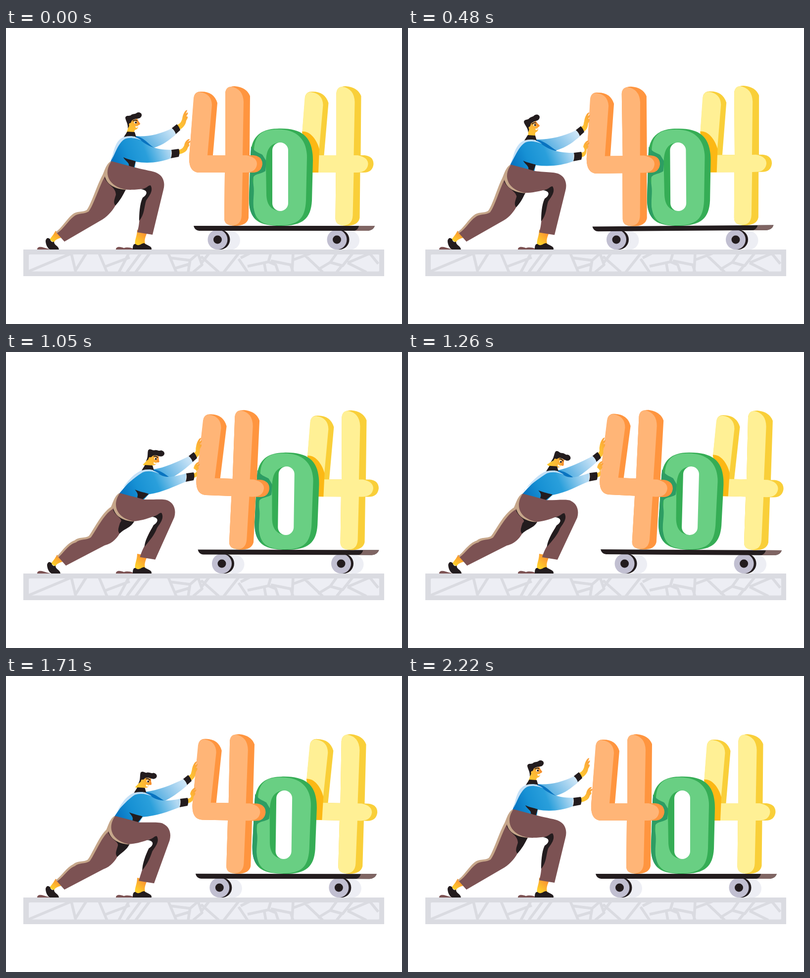
An HTML page for the animation above (2250 ms loop, 800 by 600 pixels).

```html
<!DOCTYPE html>
<html lang="en">
<head>
<meta charset="utf-8">
<title>404</title>
<style>
html, body { margin: 0; width: 100%; height: 100%; overflow: hidden; background: #fff; }
svg { display: block; width: 100%; height: 100%; }
.ink { fill: #231c1e; }
.pants { fill: #7c5253; }
.tan { fill: #c6a68a; }
.skin { fill: url(#skin); }
</style>
</head>
<body>
<svg viewBox="0 0 800 600">
<defs>
  <linearGradient id="skin" x1="0" y1="1" x2="1" y2="0">
    <stop offset="0" stop-color="#ffcb2f"/><stop offset=".45" stop-color="#fdbb35"/><stop offset="1" stop-color="#fb9a3c"/>
  </linearGradient>
  <linearGradient id="ankle" x1="0" y1="1" x2=".7" y2="0">
    <stop offset=".2" stop-color="#ffcf2b"/><stop offset="1" stop-color="#f98b33"/>
  </linearGradient>
  <linearGradient id="shirt" x1="0" y1=".75" x2="1" y2=".55">
    <stop offset="0" stop-color="#0470bf"/><stop offset=".3" stop-color="#1791d4"/>
    <stop offset=".6" stop-color="#2a9fdb"/><stop offset="1" stop-color="#b4daf3"/>
  </linearGradient>
  <linearGradient id="sleeve" x1="0" y1=".6" x2="1" y2=".2">
    <stop offset="0" stop-color="#3fa6de"/><stop offset=".45" stop-color="#86c4ea"/><stop offset="1" stop-color="#d3e8f8"/>
  </linearGradient>
  <g id="four">
    <path style="fill:var(--side)" d="M380 138Q383 128 395 129Q420 129 427 152L418 258H443V132Q444 118 462 118Q486 120 493 138L492 258H500Q518 260 518 276Q516 293 498 293H491L490 385Q487 401 462 401Q441 400 441 386L442 293H390Q369 292 370 262Z"/>
    <path style="fill:var(--face)" d="M379 142Q381 129 392 130Q415 133 416 156L407 258H443V132Q444 119 455 119Q479 123 480 150L478 258H486Q507 262 507 276Q505 293 484 293H478L476 380Q475 401 455 400Q441 399 441 386L442 293H390Q369 292 370 262Z"/>
  </g>
  <g id="wheel">
    <circle cx="454" cy="430.5" r="19" fill="#edeef4"/>
    <circle cx="432.5" cy="429" r="20" class="ink"/>
    <circle cx="427.5" cy="429" r="20" fill="#c1bfd1"/>
    <circle cx="427.5" cy="429" r="8.5" class="ink"/>
  </g>
</defs>

<g id="wheels"><use href="#wheel"/><use href="#wheel" x="241"/></g>
<rect x="35" y="449" width="729" height="54" fill="#dadbe1"/>
<rect x="46" y="459" width="708" height="34.500" rx="2" fill="#edeef4"/>
<path fill="none" stroke="#dadbe1" stroke-width="5.500" stroke-linejoin="round" d="M44 494L132 457 141 495M162 457L140 492M188 457L204 495M202 483L250 465M248 457L235 482 228 495M272 457L244 495M290 457L262 495M328 457L344 495M332 466L372 471 388 457M342 487L372 478M372 470L368 495M388 457L396 480 378 495M394 463L430 495M396 475L410 457M470 457L440 495M470 468L488 495M474 466L492 457M488 483L530 474 535 457M522 478L525 495M530 474L545 480 550 495M535 472L575 480 580 495M580 457L578 495M580 470L615 457M605 462L640 495M630 490L655 475 668 457M655 475L680 482 700 457M680 480L668 495M690 476L735 457M690 476L728 495M735 457L752 478"/>
<circle cx="239" cy="490" r="4.500" fill="#edeef4"/>

<g id="cart">
  <path class="ink" d="M379 401H745Q742 410 731 411H390Q381 410 379 401Z"/>
  <path fill="#7f6563" d="M713 401H745Q742 410 731 411H704Q711 409 713 401Z"/>
  <g id="yellow">
    <use href="#four" x="224.500" style="--face:#fff095;--side:#f9cf39"/>
    <path fill="#fcb814" d="M598 210C616 208 629 230 633 246L631 293H616Z"/>
  </g>
  <g id="zero">
    <path fill="#35ad55" d="M548 204C600 202 620 222 620 268L618 350C616 386 600 401 555 401C508 401 491 388 491 345L494 258C495 222 512 205 548 204Z"/>
    <path fill="#69cf83" d="M540 206C586 202 608 225 608 262L606 350C604 388 590 400 550 400C510 400 498 385 499 340L501 250C501 220 515 207 540 206Z"/>
    <path fill="#2d9d63" d="M495 240C503 252 510 252 518 257L526 270 524 290C512 298 498 294 498 310C504 330 498 345 500 365L505 388C494 378 490 365 491 340Z"/>
    <path fill="#35ad55" d="M553 232C531 234 525 250 525 275L526 335C526 358 535 370 555 371Z"/>
    <rect x="538" y="232" width="32" height="139" rx="16" fill="#fff"/>
  </g>
  <g id="orange"><use href="#four" style="--face:#ffb577;--side:#ff953f"/></g>
</g>

<path class="pants" d="M63 449C63 443 70 443 76 445L90 449ZM222 449C222 442 232 443 238 446C246 443 256 446 260 449Z"/>
<path fill="url(#ankle)" data-d="M100,411l L115,424l C104,427l 98,430l 97,435l L88,429l C92,423l 96,419l 100,411l Z"/>
<path class="ink" data-d="M80,431l C82,424l 86,425l 89,428l C90,433l 94,435l 97,433l C97,441l 106,441l 107,449l L89,449l C83,446l 80,438l 80,431l Z"/>
<path fill="url(#ankle)" d="M265 409L286 413C279 428 279 434 283 441L261 440C259 430 265 422 265 409Z"/>
<path class="ink" d="M256 449C256 440 258 437 262 438C268 444 274 436 279 436C284 440 294 442 294 447V449Z"/>

<path class="tan" data-d="M212,270h C202,275h 198,293h 195,298h C183,320ho 172,358hooo 163,369hooo C155,374hooo 143,370hooo 134,378hooo C122,388 112,406 100,414l L108,418l L170,380 L215,300h Z"/>
<path class="pants" data-d="M214,276h C206,290h 202,296h 199,302h C189,320ho 176,361hooo 167,372hooo C158,378hooo 146,374hooo 137,382hooo C126,390 116,408 103,416l L118,433l L195,388hooo C208,380ho 218,366ho 222,358ho L242,328h L225,300h Z"/>
<path class="ink" data-d="M199,303h C204,318h 222,322h 222,338ho C219,348ho 216,354ho 221,360ho C230,350ho 236,340h 242,327h L215,310h Z"/>

<path fill="url(#sleeve)" data-d="M262,219s C285,221sb 310,216b 336,203b L344,215b C330,227b 318,237b 298,243sb L270,236s Z"/>
<path fill="#0873c0" data-d="M260,219s C280,221s 288,237sb 300,243sb L280,246s Z"/>
<path fill="url(#shirt)" data-d="M211,272h C217,256hhs 222,232s 238,222s C250,217s 262,220s 270,226s C282,236s 298,247sf 334,247f L333,264f C310,273f 285,275sf 262,271hs L260,285h Z"/>
<path fill="#c6e1f7" data-d="M213,268h C218,250hhs 220,228s 238,221s C250,218s 264,220s 274,228s C264,223s 250,221s 240,225s C228,232s 222,250hhs 216,262h Z"/>
<path class="ink" data-d="M237,262hhs C245,266hs 256,268hs 262,270hs L258,284h L248,279h C250,273h 240,269hs 237,262hhs Z"/>

<path class="pants" data-d="M213,270h L262,283h C280,288hk 298,290k 305,294k C318,300k 322,314k 318,328k L296,419kooo L265,414kooo C270,398kooo 268,392ko 271,385ko C273,372ko 270,350k 284,338k C290,332k 287,326k 276,326k C262,328hk 245,329h 232,326h C198,320h 196,288h 213,270h Z"/>
<path class="tan" data-d="M213,270h C190,288h 194,326h 245,328h C206,322h 196,294h 213,270h Z"/>
<path class="ink" data-d="M272,327k C284,326k 286,319k 292,319k C299,330k 288,342k 283,350k C279,362k 280,378ko 269,391ko C269,378ko 270,356k 276,344k C286,338k 288,328k 272,327k Z"/>

<g id="head">
  <path class="skin" d="M248 188L265 184Q267 189 271 194Q270 197 267 197Q268 204 262 206Q259 206 259 213H243Q247 204 247 199Z"/>
  <path fill="#f58f2e" d="M265 184Q267 189 271 194Q270 197 266 196Q266 190 262 186Z"/>
  <path fill="#fff" d="M261 199Q264 200 267 198Q267 203 262 202Z"/>
  <ellipse cx="261.500" cy="191.500" rx="2.800" ry="2.200" fill="#fff"/>
  <circle cx="262.300" cy="191.600" r="1.900" class="ink"/>
  <path d="M256 189Q260 185 265 188" fill="none" stroke="#231c1e" stroke-width="1.700"/>
  <path class="ink" d="M246 204C247 194 242 189 241 182C242 176 249 179 252 177C256 173 262 175 264 172C270 169 277 174 273 180C270 185 262 183 257 186C253 187 254 191 251 193C248 192 248 197 249 198Z"/>
</g>
<path class="ink" data-d="M245,210s L260,211s L263,221s C254,218s 246,219s 238,221s Z"/>

<path class="skin" data-d="M345,197b C352,194b 354,190q 356,184q C357,176q 361,167q 366,166q C366,169q 364,171q 363,174q C369,168q 369,173q 364,179q C370,179q 366,184q 364,188q C363,196q 358,202b 351,206b Z"/>
<path class="skin" data-d="M348,247f C356,246f 358,242f 360,238p C361,231p 366,225p 371,225p C371,228p 368,229p 367,231p C374,226p 374,230p 369,235p C373,237p 368,241p 367,243p C366,249p 360,254f 349,256f Z"/>
<path class="ink" data-d="M335,203b L345,195b Q350,200b 352,207b L343,215b Q341,208b 335,203b Z"/>
<path class="ink" data-d="M334,247f L349,245f Q352,252f 349,261f L333,264f Q336,255f 334,247f Z"/>
</svg>
<script>
const LOOP = 2250, STEP = 30;
const keys = [0, 480, 810, 1050, 1530, 1890, 2220];

// Joint offsets from the rest pose, x then y.
const joints = {
  h: [[0, -5, 8, 17, 20, -5], [0, 7, 13, 16, 18, 7]],     // hip
  k: [[0, 0, 13, 22, 25, 0], [0, 2, 3, 7, 8, 2]],         // knee
  s: [[0, -3, 21, 36, 44, -3], [0, 7, 14, 19, 22, 7]],    // shoulder
  f: [[0, 1, 20, 30, 34, 1], [0, 6, 2, -1, -2, 6]],       // front cuff
  b: [[0, 4, 23, 34, 40, 4], [0, 4, 7, 8, 7, 4]],         // back cuff
  p: [[0, -6, 11, 19, 24, 0], [0, 3, 0, -2, -5, 8]],      // front fingers
  q: [[0, 0, 16, 28, 33, 4], [0, 5, 5, 8, 6, 8]],         // back fingers
  l: [[0, 0, 5, 3, 0, 0], [0, 0, 0, 0, 0, 0]]             // rear foot
};
const headTurn = [0, -10, -4, 24, 46, 2];
const cartX = [0, -6.5, 3, 8.5, 11, -3.3];
const cartTilt = [0, -.45, -.2, .15, .45, -.35];

// Each digit: pivot, base shift, lean in degrees.
const digits = {
  orange: [466, [0, -7, 3.5, 9.5, 12, -4], [0, -.9, .6, 2.1, 3, -.8]],
  zero: [555, [0, -7.5, 4, 10.6, 16, -4], [0, -.4, -.9, .8, 2, -.4]],
  yellow: [690, [0, -6.5, 2, 10, 15, -4], [0, -.4, -1.6, .2, 2.2, -.2]]
};

const $ = id => document.getElementById(id);
const place = (id, x, y, turn, cx, cy) =>
  $(id).setAttribute('transform', `translate(${x} ${y}) rotate(${turn} ${cx} ${cy})`);
const shapes = [...document.querySelectorAll('[data-d]')].map(el => [el, el.dataset.d]);

// Monotone cubic through the keys, at rest at both ends.
function at(track, t) {
  const v = i => track[i % track.length];
  const last = keys.length - 1;
  if (t >= keys[last]) return v(0);
  const i = keys.findIndex((k, n) => t < keys[n + 1]);
  const rate = n => (v(n + 1) - v(n)) / (keys[n + 1] - keys[n]);
  const slope = n => {
    if (n < 1 || n >= last) return 0;
    const a = rate(n - 1), b = rate(n);
    return a * b <= 0 ? 0 : 2 * a * b / (a + b);
  };
  const span = keys[i + 1] - keys[i], u = (t - keys[i]) / span, w = 1 - u;
  return v(i) * w * w * (1 + 2 * u) + v(i + 1) * u * u * (3 - 2 * u)
    + span * u * w * (slope(i) * w - slope(i + 1) * u);
}

// Tags after a point name the joints it follows; "o" stands still.
function pose(d, off) {
  return d.replace(/([\d.]+),([\d.]+)([a-z]*)/g, (_, x, y, tags) => {
    let px = +x, py = +y;
    for (const c of tags) {
      px += off[c][0] / tags.length;
      py += off[c][1] / tags.length;
    }
    return px.toFixed(2) + ' ' + py.toFixed(2);
  });
}

function draw(t) {
  const off = { o: [0, 0] };
  for (const j in joints) off[j] = joints[j].map(track => at(track, t));
  for (const [el, d] of shapes) el.setAttribute('d', pose(d, off));
  place('head', ...off.s, at(headTurn, t), 250, 205);

  const x = at(cartX, t), tilt = at(cartTilt, t);
  place('wheels', x, 0, 0, 0, 0);
  place('cart', x, 0, tilt, 562, 405);
  for (const id in digits) {
    const [pivot, shift, lean] = digits[id];
    place(id, at(shift, t) - x, 0, at(lean, t) - tilt, pivot, 400);
  }
}

const start = performance.now();
function frame() {
  const t = (performance.now() - start) % LOOP;
  draw(Math.floor(t / STEP) * STEP);
  requestAnimationFrame(frame);
}
frame();
</script>
</body>
</html>
```
